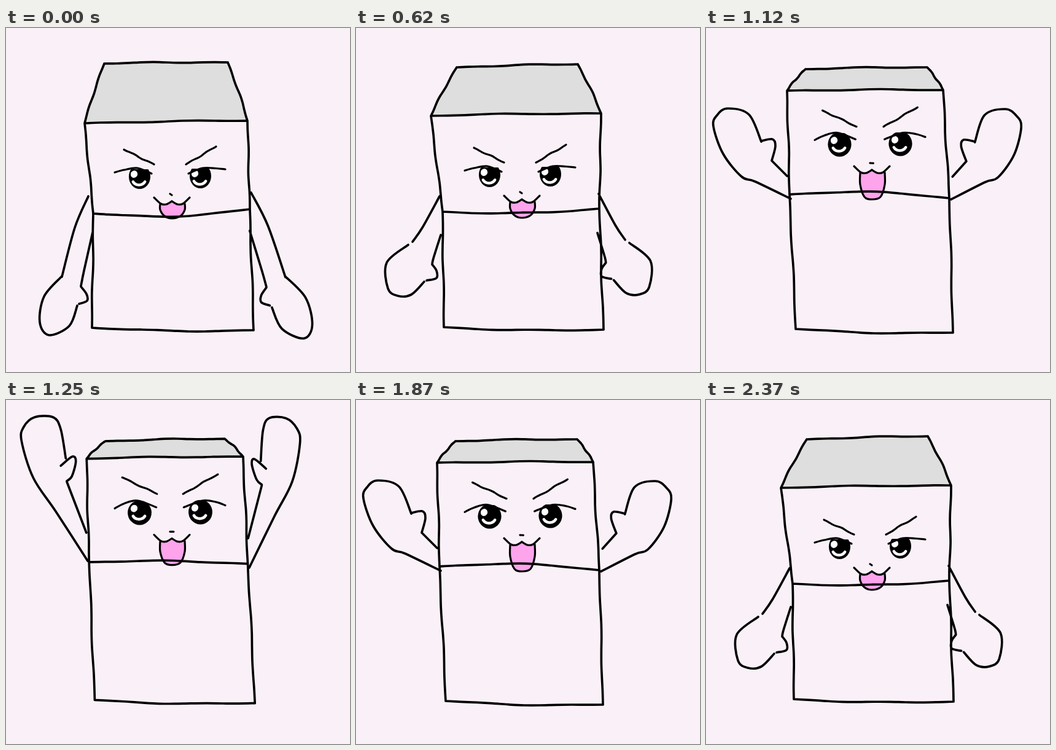
An HTML page with a canvas that plays this animation: 560 px wide and 560 px high, repeating every 2.5 s.

```html
<!DOCTYPE html>
<html lang="en">
<head>
<meta charset="utf-8">
<title>Carton flapping its arms</title>
<style>
html, body { margin: 0; width: 100%; height: 100%; overflow: hidden; background: #faf1f8; }
canvas { display: block; width: 560px; height: 560px; }
</style>
</head>
<body>
<canvas id="stage" width="560" height="560"></canvas>
<script>
const ctx = document.getElementById('stage').getContext('2d');
const PAPER = '#faf1f8', INK = '#000', GREY = '#dedede', PINK = '#fda4ec';
const MID = 267;

// Arm shapes: "outward,down" key points measured from the shoulder.
const ARMS = {
  hang: '0,0 22,51 43,131|43,130 72,163 79,205 64,226 31,211 18,178|-7,59 7,121 12,146|12,147 3,159 2,170 15,175',
  tuck: '0,0 29,68 45,141|49,141 63,178 70,203 55,237 22,227 15,188|-3,72 6,113 15,158|15,160 6,166 4,179 15,188',
  bend: '0,0 28,51 44,74|51,79 86,108 84,150 68,162 46,160 25,139|-2,63 10,101 12,111|12,111 5,121 5,133 21,137',
  side: '0,0 53,20 100,20 114,0 100,-34 60,-30|60,-30 50,-45 38,-36 42,-23|42,-23 3,-40',
  wave: '0,0 58,-28 80,-36 110,-73 126,-118 120,-136 103,-147 68,-137 48,-93|48,-94 30,-97 25,-86 31,-62|31,-62 6,-37',
  lift: '0,0 46,-80 79,-135 94,-195 89,-218 70,-234 40,-234 29,-215 24,-167|33,-155 13,-170 8,-162 16,-138 25,-130|25,-129 -1,-46'
};

// roof: top and bottom corners; left/right: shoulder x, y, width, lean, height.
const down = {
  roof: [[160, 58], [361, 56], [128, 155], [393, 151]],
  fold: [[142, 302], [397, 295]], sag: 8, base: [[140, 488], [403, 492]],
  eye: 245, open: 0, tongue: 65, arm: 'hang',
  left: [134, 274, 1, 0, 1], right: [399, 268, 1.04, 0.085, 1.05]
};
const sunk = {
  roof: [[161, 58], [361, 56], [127, 156], [392, 156]],
  fold: [[141, 304], [394, 301]], sag: 7, base: [[138, 487], [406, 491]],
  eye: 246, open: 0, tongue: 69, arm: 'tuck',
  left: [137, 267, 1, 0, 1], right: [396, 264, 1.12, 0.036, 1.04]
};
const low = {
  roof: [[164, 64], [361, 59], [122, 143], [399, 139]],
  fold: [[141, 299], [396, 294]], sag: 5, base: [[143, 487], [403, 491]],
  eye: 242, open: 0, tongue: 67, arm: 'bend',
  left: [136, 274, 1, 0, 1], right: [395, 270, 0.98, 0, 1.01]
};
const high = {
  roof: [[162, 67], [360, 64], [132, 102], [386, 101]],
  fold: [[136, 271], [396, 277]], sag: -7, base: [[146, 490], [402, 496]],
  eye: 190, open: 0.8, tongue: 89, arm: 'wave',
  left: [138, 278, 1, 0, 1], right: [399, 279, 1, -0.1, 1]
};
const up = {
  roof: [[162, 67], [355, 63], [131, 94], [386, 90]],
  fold: [[135, 262], [393, 264]], sag: -2, base: [[144, 488], [406, 493]],
  eye: 182, open: 1, tongue: 84, arm: 'lift',
  left: [131, 260, 1, 0, 1], right: [396, 273, 0.9, -0.07, 1.06]
};

function lerp(a, b, k) {
  return Array.isArray(a) ? a.map((v, i) => lerp(v, b[i], k)) : a + (b - a) * k;
}

function mix(a, b, k, changes) {
  const out = { ...changes };
  for (const key in a) if (!(key in out)) out[key] = lerp(a[key], b[key], k);
  return out;
}

const wide = mix(low, high, 0.5, {
  arm: 'side', left: [138, 298, 1, 0, 1], right: [397, 298, 1, 0, 1]
});
const spread = mix(up, high, 0.2, {
  arm: 'lift', left: [133, 262, 1, 0.07, 1], right: [396, 273, 0.92, -0.02, 1.04]
});

// A hand-drawn line: bowed sideways, with a slight tremble.
function line(a, b, bow = 0) {
  const dx = b[0] - a[0], dy = b[1] - a[1], len = Math.hypot(dx, dy);
  const seed = a[0] * 1.7 + b[1];
  return Array.from({ length: 11 }, (_, i) => {
    const t = i / 10;
    const off = (bow + Math.sin(seed + t * 10)) * Math.sin(Math.PI * t);
    return [a[0] + dx * t - dy / len * off, a[1] + dy * t + dx / len * off];
  });
}

function armStrokes(shape, [x, y, width, lean, height], dir) {
  return ARMS[shape].split('|').map(stroke => stroke.split(' ').map(p => {
    const [out, fall] = p.split(',').map(Number);
    return [x + dir * (out * width + Math.abs(fall) * lean), y + fall * height];
  }));
}

// Smooth curve through every point.
function trace(pts) {
  ctx.moveTo(...pts[0]);
  for (let i = 0; i < pts.length - 1; i++) {
    const b = pts[i], c = pts[i + 1], a = pts[i - 1] || b, d = pts[i + 2] || c;
    ctx.bezierCurveTo(b[0] + (c[0] - a[0]) / 6, b[1] + (c[1] - a[1]) / 6,
      c[0] - (d[0] - b[0]) / 6, c[1] - (d[1] - b[1]) / 6, c[0], c[1]);
  }
}

function ink(strokes, width) {
  ctx.strokeStyle = INK;
  ctx.lineWidth = width;
  ctx.beginPath();
  strokes.forEach(trace);
  ctx.stroke();
}

function fill(pts, color) {
  ctx.fillStyle = color;
  ctx.beginPath();
  pts.forEach(p => ctx.lineTo(...p));
  ctx.fill();
}

function oval(x, y, rx, ry, tilt, color) {
  ctx.fillStyle = color;
  ctx.beginPath();
  ctx.ellipse(x, y, rx, ry, tilt, 0, Math.PI * 2);
  ctx.fill();
}

function drawEye(x, y, open) {
  ctx.save();
  ctx.beginPath();
  ctx.rect(x - 30, y - 15 - 5 * open, 60, 60);
  ctx.clip();
  oval(x, y - 3 * (1 - open), 17.5 + 2 * open, 20, 0, INK);
  oval(x - 9, y - 7, 5.5, 6, 0.5, '#fff');
  ctx.strokeStyle = '#fff';
  ctx.lineWidth = 4.5;
  ctx.beginPath();
  ctx.ellipse(x - 1, y + 2, 10.5, 8.5, 0, 0.4, Math.PI - 0.4);
  ctx.stroke();
  ctx.restore();
}

function drawFace({ eye, open, tongue }) {
  const lines = [];
  for (const dir of [-1, 1]) {
    const rise = dir > 0 ? 5 : 0;
    const at = (out, y) => [MID + dir * out, eye + y];
    drawEye(MID + dir * 49.5, eye - rise / 5, open);
    lines.push(line(at(75 + 3 * open, -47 - 11 * open - rise), at(26 - 5 * open, -23 - 8 * open)));
    lines.push([at(90, -10 + 3 * open - rise), at(75, -14 - open - rise / 2),
      at(53, -17 - 3 * open), at(30 - 8 * open, -8 - open)]);
  }
  lines.push([[MID, eye + 25 + 6 * open], [MID + 3 + 3 * open, eye + 27 + 4 * open]]);

  const x = MID + 3, cusp = eye + 37 + 5 * open;
  const lip = dir => [[x, cusp], [x + dir * 9, cusp + 5], [x + dir * 18, cusp + 4],
    [x + dir * 29, cusp - 6]];
  const end = eye + tongue, deep = end - cusp;
  const lick = [[x - 19, cusp + 4], [x - 19, cusp + deep * 0.5], [x - 12, end - 4],
    [x, end], [x + 14, end - 4], [x + 21, cusp + deep * 0.5], [x + 21, cusp + 4]];
  fill([...lick, [x + 9, cusp + 5], [x, cusp], [x - 9, cusp + 5]], PINK);
  lines.push(lip(-1), lip(1), lick);
  ink(lines, 3.2);
}

function draw(p) {
  ctx.fillStyle = PAPER;
  ctx.fillRect(0, 0, 560, 560);
  ctx.lineCap = ctx.lineJoin = 'round';
  const [tl, tr, bl, br] = p.roof, [fl, fr] = p.fold, [gl, gr] = p.base;
  const top = line(tl, tr, -1), right = line(tr, br, -1.5);
  const eave = line(bl, br, -1), left = line(tl, bl, 1.5);
  fill([...top, ...right, ...eave.reverse(), ...left.reverse()], GREY);
  drawFace(p);
  ink([
    top, right, eave, left,
    line(bl, fl), line(br, fr), line(fl, fr, p.sag),
    line(fl, gl), line(fr, gr), line(gl, gr, 3),
    ...armStrokes(p.arm, p.left, -1), ...armStrokes(p.arm, p.right, 1)
  ], 3.7);
}

const LOOP = 2500;
const timeline = [
  [250, down], [500, sunk], [620, down], [870, low], [1120, wide], [1250, high],
  [1500, spread], [1750, up], [1870, spread], [2120, high], [2370, wide], [LOOP, low]
];

const start = performance.now();
let shown;
function tick() {
  const t = (performance.now() - start) % LOOP;
  const pose = timeline.find(([end]) => t < end)[1];
  if (pose !== shown) draw(shown = pose);
  requestAnimationFrame(tick);
}
tick();
</script>
</body>
</html>
```
